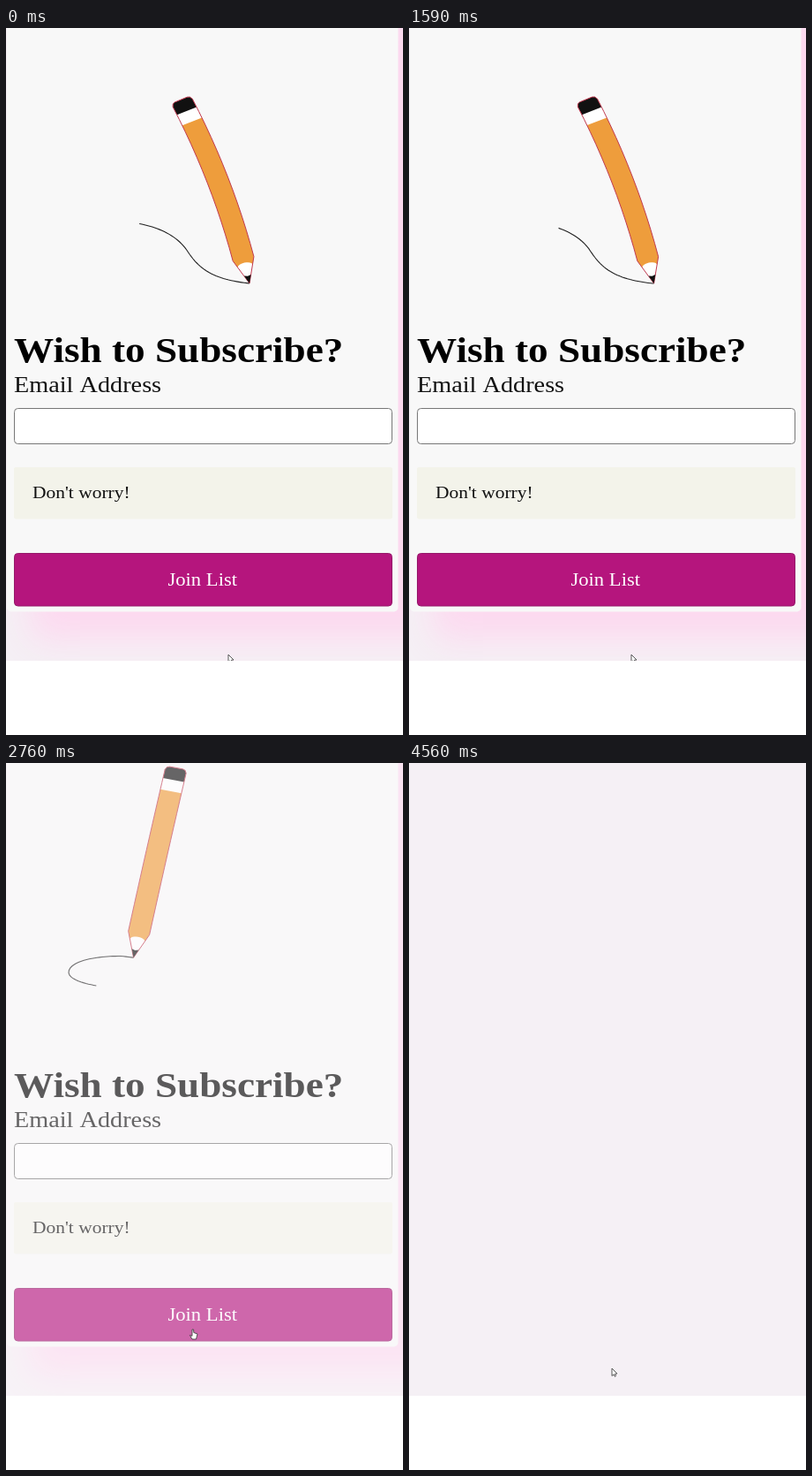
Animation of 450 by 800 pixels, one loop 4.71 s. Source, as an HTML page with a canvas:

```html
<!DOCTYPE html>
<html lang="en">
<head>
<meta charset="utf-8">
<title>Subscribe form</title>
<style>
html, body { margin: 0; width: 100%; height: 100%; overflow: hidden; background: #fff; }
canvas { display: block; width: 450px; height: 800px; }
</style>
</head>
<body>
<canvas id="stage" width="450" height="800"></canvas>
<script>
const ctx = document.getElementById('stage').getContext('2d');
const LOOP = 4710, STEP = 30, SCRIBBLE_PERIOD = 1585;
const WIDTH = 450, FLOOR = 716;
const ASPECT = 1.13; // the whole page is shown wider than it is drawn
const PENCIL_LENGTH = 219, PENCIL_HALF = 10.8;
const BACKDROP = '#f5f0f5', VEIL = '#f8f6f8', INK = '#111', PLANE = '#ee43ff';

const clamp = (v, lo, hi) => Math.min(hi, Math.max(lo, v));
const progress = (t, start, duration) => clamp((t - start) / duration, 0, 1);
const easeInOut = u => (1 - Math.cos(Math.PI * u)) / 2;
const rad = deg => deg * Math.PI / 180;

function curve(d) {
  const path = document.createElementNS('http://www.w3.org/2000/svg', 'path');
  path.setAttribute('d', d);
  const length = path.getTotalLength();
  const at = s => {
    const p = path.getPointAtLength(s);
    return [p.x, p.y];
  };
  const part = (from, to) => {
    const points = [];
    for (let s = from; s < to; s += 3) points.push(at(s));
    return [...points, at(to)];
  };
  return { length, at, part };
}

const scribble = curve(`M276 289 C320 291 343 283 343 272 C343 258 305 252 270 251.5
  C230 251 195 256 156 256 C108 256 71 248 71 237 C71 226 95 218.5 130 218.5
  C170 222 192 234 204 250 C217 270 230 284 276 289`);
const flight = curve(`M-80 412 L10 386 C120 352 332 310 335 242 C336 205 295 185 250 185
  C200 185 163 215 163 248 C163 290 215 309 260 309 C340 309 400 292 600 252`);

function trace(points, close) {
  ctx.beginPath();
  points.forEach(p => ctx.lineTo(...p));
  if (close) ctx.closePath();
}

function stroke(color, width) {
  ctx.strokeStyle = color;
  ctx.lineWidth = width;
  ctx.stroke();
}

function polygon(points, fill, line, width = 1) {
  trace(points, true);
  if (fill) { ctx.fillStyle = fill; ctx.fill(); }
  if (line) stroke(line, width);
}

function box(x, y, w, h, r, fill, line) {
  ctx.beginPath();
  ctx.roundRect(x, y, w, h, r);
  ctx.fillStyle = fill;
  ctx.fill();
  if (line) stroke(line, 1);
}

function label(text, x, y, size, color = INK, weight = '') {
  ctx.save();
  ctx.scale(ASPECT, 1);
  ctx.font = `${weight} ${size}px "Liberation Serif", serif`;
  ctx.fillStyle = color;
  ctx.fillText(text, x / ASPECT, y);
  ctx.restore();
}

function drawForm() {
  ctx.save();
  ctx.shadowColor = 'rgba(255, 210, 238, 0.75)';
  ctx.shadowBlur = 36;
  ctx.shadowOffsetX = 1000;
  ctx.fillRect(-972, -20, 520, 712);
  ctx.restore();
  box(1, -10, 443.5, 670.5, 5, '#f8f8f8');
  label('Wish to Subscribe?', 9, 378, 40, '#000', 'bold');
  label('Email Address', 9, 412, 25);
  box(9.5, 430.5, 428, 40, 4, '#fff', '#777');
  box(9, 497, 429, 58.5, 2, '#f3f3ea');
  label("Don't worry!", 30, 532, 19);
  box(9.5, 594.5, 428, 59.5, 4, '#b5157d', '#95196a');
  label('Join List', 183.5, 631, 20, '#fff');
}

function pencilState(t) {
  const p = (t / SCRIBBLE_PERIOD) % 1, a = 2 * Math.PI * p;
  const pace = p + 0.015 * (Math.sin(a) + 1 - Math.cos(a)) - 0.019 * Math.sin(2 * a);
  return {
    travel: pace * scribble.length,
    tilt: 6.75 - 14.2 * Math.cos(a) + 7 * Math.sin(a) - 10.85 * Math.cos(2 * a),
    bend: -13.5 * Math.cos(a)
  };
}

function drawTrail(travel, length) {
  const tail = travel - length;
  const points = tail < 0
    ? [...scribble.part(scribble.length + tail, scribble.length), ...scribble.part(0, travel)]
    : scribble.part(tail, travel);
  trace(points);
  stroke('#222', 1.1);
}

function drawPencil(t) {
  const { travel, tilt, bend } = pencilState(t);
  drawTrail(travel, 147 - 0.011 * t);

  // along: distance from the tip, across: offset from the bent axis
  const [x, y] = scribble.at(travel);
  const place = ([along, across]) => {
    const start = rad(tilt - bend / 2), end = start + rad(bend) * along / PENCIL_LENGTH;
    const mid = (start + end) / 2;
    return [
      x + ASPECT * (along * Math.sin(mid) + across * Math.cos(end)),
      y - along * Math.cos(mid) + across * Math.sin(end)
    ];
  };
  const shape = (points, ...style) => polygon(points.map(place), ...style);
  const run = (f, n = 12) => Array.from({ length: n + 1 }, (_, i) => f(i / n));
  const side = (from, to, across) => run(u => [from + (to - from) * u, across]);
  const h = PENCIL_HALF, shoulder = 28.5, end = PENCIL_LENGTH;
  const top = [[end - 4, -h], [end - 1, -h + 1.5], [end, -h + 4],
    [end, h - 4], [end - 1, h - 1.5], [end - 4, h]];
  const outline = [[0, 0], ...side(shoulder, end - 4, -h), ...top, ...side(end - 4, shoulder, h)];
  const scallop = run(u => [20 + 4 * Math.sin(Math.PI * u), 7.6 * Math.cos(Math.PI * u)]);

  shape(outline, '#fff');
  shape([...side(shoulder, 192, -h), ...side(192, shoulder, h), ...scallop], '#ee9d3c');
  shape([[205, -h], ...top, [205, h]], INK);
  shape(outline, null, '#c0394f');
  shape([[0, 0], [9.5, -3.5], [8.5, 0], [9.5, 3.5]], INK);
}

function drawPlane(t) {
  const travel = 1060 * easeInOut(progress(t, 3270, 1120));
  const tail = Math.max(0, 94 + 0.885 * (t - 3540));
  if (tail < travel) {
    trace(flight.part(tail, travel));
    ctx.setLineDash([5, 3]);
    ctx.lineDashOffset = tail;
    stroke('#888', 1.8);
    ctx.setLineDash([]);
  }
  const center = travel + 35;
  const [x0, y0] = flight.at(center - 10), [x1, y1] = flight.at(center + 10);
  const nose = [43.5, -12];
  ctx.save();
  ctx.translate(...flight.at(center));
  ctx.rotate(Math.atan2(y1 - y0, x1 - x0) + rad(17));
  polygon([[-51.5, -6], nose, [-33.5, 3]], PLANE);
  polygon([[-34.5, 2], nose, [-14.5, 13], [-29.5, 20]], '#b32bc8');
  polygon([[-26.5, 6.5], nose, [-3.5, 22]], PLANE);
  ctx.restore();
}

function drawPointer(t) {
  const enter = easeInOut(progress(t, 1980, 340)), leave = easeInOut(progress(t, 2790, 360));
  const x = 252 - 40 * enter + 18 * leave, y = 709 - 68 * enter + 44 * leave;
  const arrow = [[0, 0], [0, 8.5], [2, 6.8], [3.3, 9.3], [4.5, 8.6], [3.4, 6.2], [6, 6]];
  const hand = [[-1, 0], [0.6, 0], [0.8, 3.5], [5, 5], [3.5, 11], [-1, 11], [-3.6, 6.5], [-1, 7.3]];
  ctx.save();
  ctx.translate(x, y);
  polygon(y < 655 ? hand : arrow, '#fff', '#444', 0.9);
  ctx.restore();
}

function draw(t) {
  ctx.fillStyle = '#fff';
  ctx.fillRect(0, 0, WIDTH, 800);
  ctx.save();
  ctx.beginPath();
  ctx.rect(0, 0, WIDTH, FLOOR);
  ctx.clip();
  ctx.fillStyle = BACKDROP;
  ctx.fillRect(0, 0, WIDTH, FLOOR);
  if (t < 3180) {
    drawForm();
    drawPencil(t);
    ctx.globalAlpha = 1 - Math.pow(1 - progress(t, 2640, 540), 1.8);
    ctx.fillStyle = VEIL;
    ctx.fillRect(0, 0, WIDTH, FLOOR);
    ctx.globalAlpha = 1;
  }
  if (t >= 3300 && t < 4560) drawPlane(t);
  drawPointer(t);
  ctx.restore();
}

const began = performance.now();
function tick() {
  const t = (performance.now() - began) % LOOP;
  draw(Math.min(Math.floor(t / STEP) * STEP, 4560));
  requestAnimationFrame(tick);
}
tick();
</script>
</body>
</html>
```
